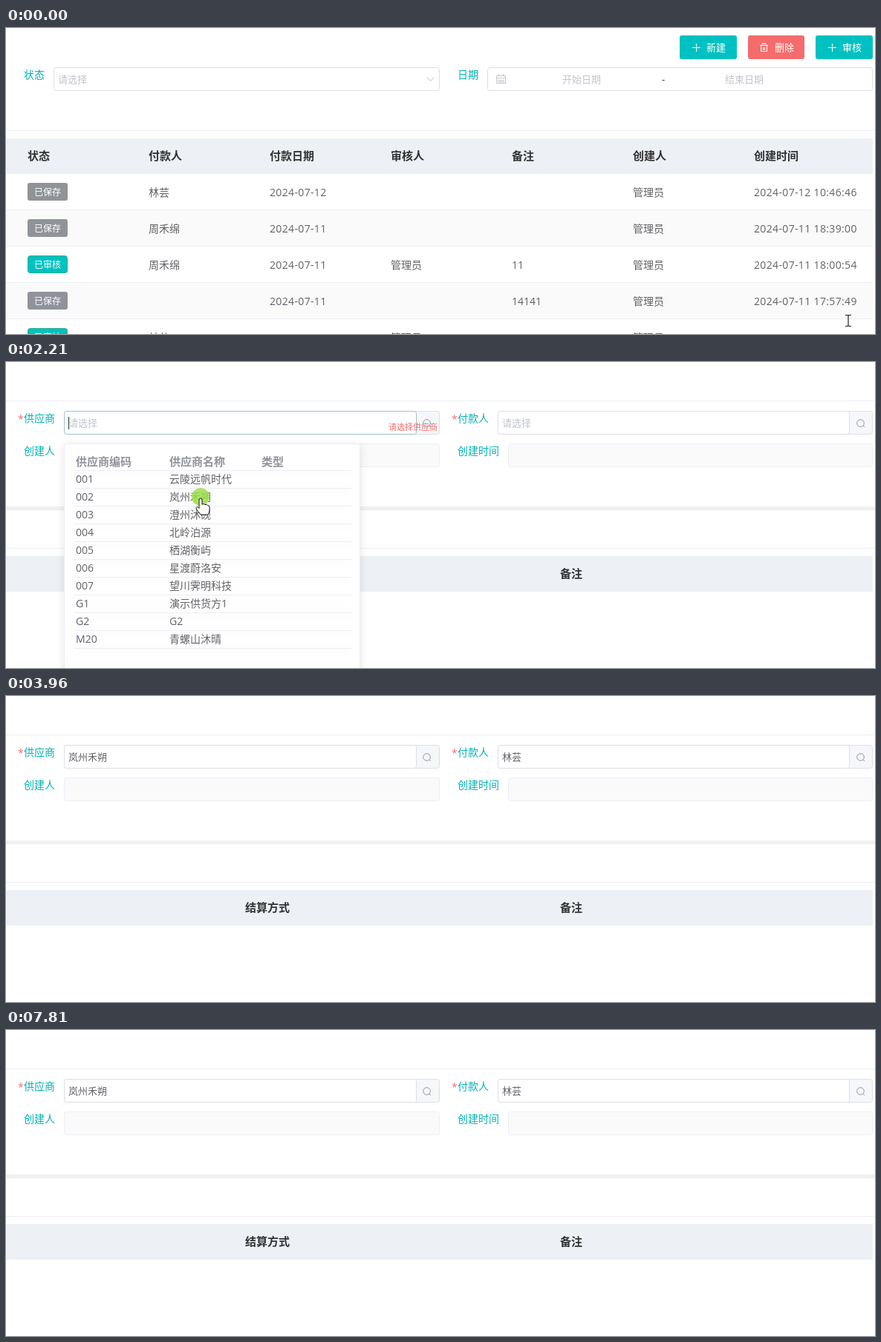
Write an HTML page that moves like this. It is 1170 px wide and 413 px high and loops after 8.74 s.

```html
<!DOCTYPE html>
<html lang="zh-CN">
<head>
<meta charset="utf-8">
<title>付款单</title>
<style>
  html, body { margin: 0; width: 100%; height: 100%; overflow: hidden; background: #fff; }
  svg { display: block; font-family: "Open Sans", "Noto Sans CJK SC", "Noto Sans CJK", sans-serif; }
  .date { letter-spacing: .35px; }
  .bold { font-weight: 700; }
  .popup > rect { filter: drop-shadow(0 2px 6px rgba(0, 0, 0, .1)); }
</style>
</head>
<body>
<svg id="stage" width="1170" height="413" viewBox="0 0 1170 413"></svg>
<script>
const LOOP = 8740;
const TEAL = '#00c1c1', LABEL = '#00b3b5', RED = '#f56c6c', INK = '#606266', DARK = '#303133',
      PALE = '#c0c4cc', EDGE = '#dcdfe6', LINE = '#ebeef5', HEAD = '#edf0f5';
const PAYER = '林芸', PAYER2 = '周禾绵', SUPPLIER = '岚州禾朔', ADMIN = '管理员';

// Text placed by left edge and vertical middle.
const text = (x, mid, s, size = 14, fill = INK, cls = '') =>
  `<text x="${x}" y="${Math.round(mid + size * .38)}" font-size="${size}" fill="${fill}" class="${cls}">${s}</text>`;
const fill = (x, y, w, h, color, r = 0) =>
  `<rect x="${x}" y="${y}" width="${w}" height="${h}" rx="${r}" fill="${color}"/>`;
const box = (x, y, w, h, color, edge = EDGE, id = '') =>
  `<rect ${id && `id="${id}"`} x="${x + .5}" y="${y + .5}" width="${w - 1}" height="${h - 1}" rx="3" fill="${color}" stroke="${edge}"/>`;
const path = (d, stroke, more = '') => `<path d="${d}" fill="none" stroke="${stroke}" ${more}/>`;
const group = (id, body, more = '') => `<g id="${id}" ${more}>${body}</g>`;

// ---- list page
const plus = x => path(`M${x - 5.5} 26.5h11M${x} 21v11`, '#fff');
const trash = path('M1015 23.5h11M1018 23v-2h5v2M1016.5 24v7.5h8V24M1019.5 26v4M1021.5 26v4', '#fff');
const button = (x, w, color, s, icon) => fill(x, 10, w, 32, color, 3) + icon + text(x + 36, 26, s, 13, '#fff');

const filters =
  button(907, 77, TEAL, '新建', plus(929.5)) +
  button(999, 76, RED, '删除', trash) +
  button(1090, 77, TEAL, '审核', plus(1112.5)) +
  text(24, 63, '状态', 14, LABEL) + box(64, 53, 520, 32, '#fff') +
  text(70, 69, '请选择', 13, PALE) + path('M566.5 66.5l5 5 5-5', PALE) +
  text(608, 63, '日期', 14, LABEL) + box(648, 53, 519, 32, '#fff') +
  path('M660.5 64.5h12v10h-12zM660 67.5h12M663.5 62v3M669.5 62v3M662 70.5h9M662 72.5h9', PALE) +
  text(749, 69, '开始日期', 13, PALE) + text(883, 69, '-', 13, DARK) + text(968, 69, '结束日期', 13, PALE) +
  fill(0, 138, 1170, 1, LINE);

const columns = [29, 192, 355, 518, 681, 844, 1007];
const records = [
  [0, PAYER, '2024-07-12', '', '', ADMIN, '2024-07-12 10:46:46'],
  [0, PAYER2, '2024-07-11', '', '', ADMIN, '2024-07-11 18:39:00'],
  [1, PAYER2, '2024-07-11', ADMIN, '11', ADMIN, '2024-07-11 18:00:54'],
  [0, '', '2024-07-11', '', '14141', ADMIN, '2024-07-11 17:57:49'],
  [1, PAYER, '2024-07-04', ADMIN, '', ADMIN, '2024-07-04 14:01:53']
];
const tag = (y, done) =>
  (done ? box(29, y, 54, 24, TEAL, '#2fae86') : fill(29, y, 54, 24, '#909399', 3)) +
  text(38, y + 12, done ? '已审核' : '已保存', 12, '#fff');
const row = (r, i) => {
  const y = 197 + 49 * i;
  return fill(0, y, 1167, 49, i % 2 ? '#fafafa' : '#fff') + fill(0, y + 48, 1167, 1, LINE) + tag(y + 12, r[0]) +
    r.slice(1).map((s, k) => text(columns[k + 1], y + 24.5, s, 14, INK, /-/.test(s) ? 'date' : '')).join('');
};
const table = fill(0, 149, 1167, 48, HEAD) +
  ['状态', '付款人', '付款日期', '审核人', '备注', '创建人', '创建时间']
    .map((s, i) => text(columns[i], 172, s, 15, DARK, 'bold')).join('') +
  records.map(row).join('');

// The table for a moment before its width is known.
const narrow = fill(0, 149, 87, 48, HEAD) + text(10, 172, '创建时间', 15, '#55585e', 'bold') +
  records.slice(0, 4).map((r, i) => {
    const y = 197 + 71 * i, s = r[6];
    return fill(0, y, 87, 71, i % 2 ? '#fafafa' : '#fff') + fill(0, y + 70, 87, 1, LINE) +
      text(10, y + 24, s.slice(0, 9), 14, INK, 'date') + text(10, y + 47, s.slice(9), 14, INK, 'date');
  }).join('');

// ---- form page
const picker = (id, x, label, w) =>
  text(x - 62, 77, '*', 14, RED) + text(x - 54, 76, label, 14, LABEL) +
  box(x, 66, 506 - (id === 'payer'), 32, '#f5f7fa') + box(x, 66, w, 32, '#fff', EDGE, id + 'Box') +
  `<circle cx="${x + 488.5}" cy="82.5" r="4.8" fill="none" stroke="#909399"/>` + path(`M${x + 492} 86l2 2`, '#909399') +
  group(id + 'Hint', text(x + 6, 82, '请选择', 13, PALE)) +
  group(id + 'Value', text(x + 6, 82, id === 'payer' ? PAYER : SUPPLIER, 13)) +
  group(id + 'Caret', fill(x + 6, 74, 1, 17, DARK));
const form =
  fill(0, 52, 1170, 1, LINE) +
  picker('supplier', 78, '供应商', 475) + picker('payer', 662, '付款人', 474) +
  group('error', text(515, 88, '请选择供应商', 11, RED)) +
  text(24, 120, '创建人', 14, LABEL) + box(78, 110, 506, 32, '#fafafa', LINE) +
  text(608, 120, '创建时间', 14, LABEL) + box(676, 110, 491, 32, '#fafafa', LINE) +
  fill(0, 195, 1170, 5, '#f0f0f0') + fill(0, 251, 1170, 1, LINE) + fill(0, 262, 1167, 48, HEAD) +
  text(322, 285, '结算方式', 15, DARK, 'bold') + text(746, 285, '备注', 15, DARK, 'bold');

const popup = (id, x, heads, names) => {
  const codes = ['001', '002', '003', '004', '005', '006', '007', 'G1', 'G2', 'M20'];
  return group(id, box(x, 110, 399, 330, '#fff', LINE) +
    heads.map((s, i) => text(x + [16, 142, 266][i], 134, s, 15, '#909399', 'bold')).join('') +
    fill(x + 14, 146, 373, 1, LINE) +
    names.map((s, i) => text(x + 16, 158 + 24 * i, codes[i]) + text(x + 142, 158 + 24 * i, s) +
      fill(x + 14, 170 + 24 * i, 373, 1, LINE)).join(''), 'class="popup"');
};
const popups =
  popup('supplierPop', 78, ['供应商编码', '供应商名称', '类型'],
    ['云陵远帆时代', SUPPLIER, '澄州沐砚', '北岭泊源', '栖湖衡屿', '星渡蔚洛安', '望川霁明科技', '演示供货方1', 'G2', '青螺山沐晴']) +
  popup('payerPop', 662, ['员工编码', '员工名称'],
    [ADMIN, PAYER2, '许知岚', PAYER, '沈墨', '顾予晴', '叶舟', '梁书禾', '程安', '苏砚秋']);

// ---- pointer
const pointer =
  group('click', '<circle cy="-2" r="12" fill="#9be04c" fill-opacity=".85"/>') +
  group('arrow', path('M.5 .5V17l4-4 3 6.5 2.5-1-3-6.5h5.5z', '#333', 'style="fill:#fff"')) +
  group('beam', path('M-4-7.5h3l1 1 1-1h3M0-7V7M-4 7.5h3l1-1 1 1h3', '#222', 'stroke-width="1.2"')) +
  group('hand', path('M-2 11V2a2 2 0 0 1 4 0V8q3-1 4 .5 3-.7 3.5 1 2.5 0 2.5 2.5v4q0 3-2 6H0q-2-3-5.5-7-1.5-3 .5-3.5 1.5 0 3 2z',
    '#111', 'style="fill:#fff"'));

const stage = document.getElementById('stage');
stage.innerHTML = group('list', filters + group('table', table) + group('narrow', narrow)) +
  group('form', form + popups) + group('pointer', pointer);
const el = {};
stage.querySelectorAll('[id]').forEach(n => el[n.id] = n);

const NONE = '', ARROW = 'arrow', BEAM = 'beam', HAND = 'hand';
// time, x, y, pointer shape from then on
const track = [
  [0, 1134, 395, BEAM], [70, 1134, 395, ARROW], [280, 1055, 150, ARROW], [480, 963, 28, HAND],
  [700, 963, 28, ARROW], [890, 955, 33, ARROW], [960, 955, 33, ARROW], [1500, 208, 75, ARROW],
  [1860, 208, 75, ARROW], [2130, 262, 184, HAND], [2330, 262, 184, ARROW], [2700, 778, 78, BEAM],
  [2770, 790, 75, BEAM], [3170, 790, 75, ARROW], [3390, 762, 232, HAND], [3660, 762, 232, ARROW],
  [3930, 5, 46, NONE], [5220, 55, 26, ARROW], [5770, 960, 22, ARROW], [6039, 960, 22, ARROW],
  [6040, 963, 22, HAND], [6370, 963, 22, ARROW], [6840, 963, 24, ARROW], [7000, 912, 160, ARROW],
  [7170, 300, 150, ARROW], [7300, 110, 84, BEAM], [7450, 320, 88, BEAM], [7600, 897, 86, BEAM],
  [7670, 805, 88, ARROW], [7740, 650, 296, ARROW], [7810, 650, 296, NONE], [LOOP, 650, 296, NONE]
];
const clicks = [[540, 700], [1560, 1660], [2180, 2270], [2970, 3040], [3450, 3530], [6240, 6370]];

const within = (v, a, b) => v >= a && v < b;
const ramp = (t, a, b) => Math.min(1, Math.max(0, (t - a) / (b - a)));
const show = (id, on) => { el[id].style.display = on ? '' : 'none'; };
const fade = (id, a) => { show(id, a > 0); el[id].style.opacity = a; };

function field(id, x, t, focus, picked, mx, my, shape) {
  const focused = within(t, focus, picked);
  const hover = shape && within(mx, x, x + 475) && within(my, 66, 98);
  show(id + 'Hint', t < picked);
  show(id + 'Value', t >= picked);
  show(id + 'Caret', focused);
  el[id + 'Box'].setAttribute('stroke', focused ? '#9fc0c8' : hover ? PALE : EDGE);
}

function draw(t) {
  const i = track.findIndex((k, n) => t < track[n + 1][0]);
  const [t0, x0, y0, shape] = track[i], [t1, x1, y1] = track[i + 1];
  const p = ramp(t, t0, t1), x = x0 + (x1 - x0) * p, y = y0 + (y1 - y0) * p;

  const list = t < 700 || within(t, 4950, 6370), early = within(t, 4950, 5020);
  show('list', list);
  show('form', !list);
  show('table', !early);
  show('narrow', early);

  field('supplier', 78, t, 1580, 2270, x, y, shape);
  field('payer', 662, t, 3000, 3530, x, y, shape);
  const opening = ramp(t, 1630, 1830);
  fade('supplierPop', opening - ramp(t, 2270, 2470));
  fade('payerPop', ramp(t, 3040, 3240) - ramp(t, 3530, 3730));
  fade('error', t < 2270 ? opening : 0);

  for (const s of [ARROW, BEAM, HAND]) show(s, s === shape);
  show('click', clicks.some(([a, b]) => within(t, a, b)));
  el.pointer.setAttribute('transform', `translate(${x.toFixed(1)} ${y.toFixed(1)})`);
}

const start = performance.now();
function tick() {
  draw((performance.now() - start) % LOOP);
  requestAnimationFrame(tick);
}
tick();
</script>
</body>
</html>
```
